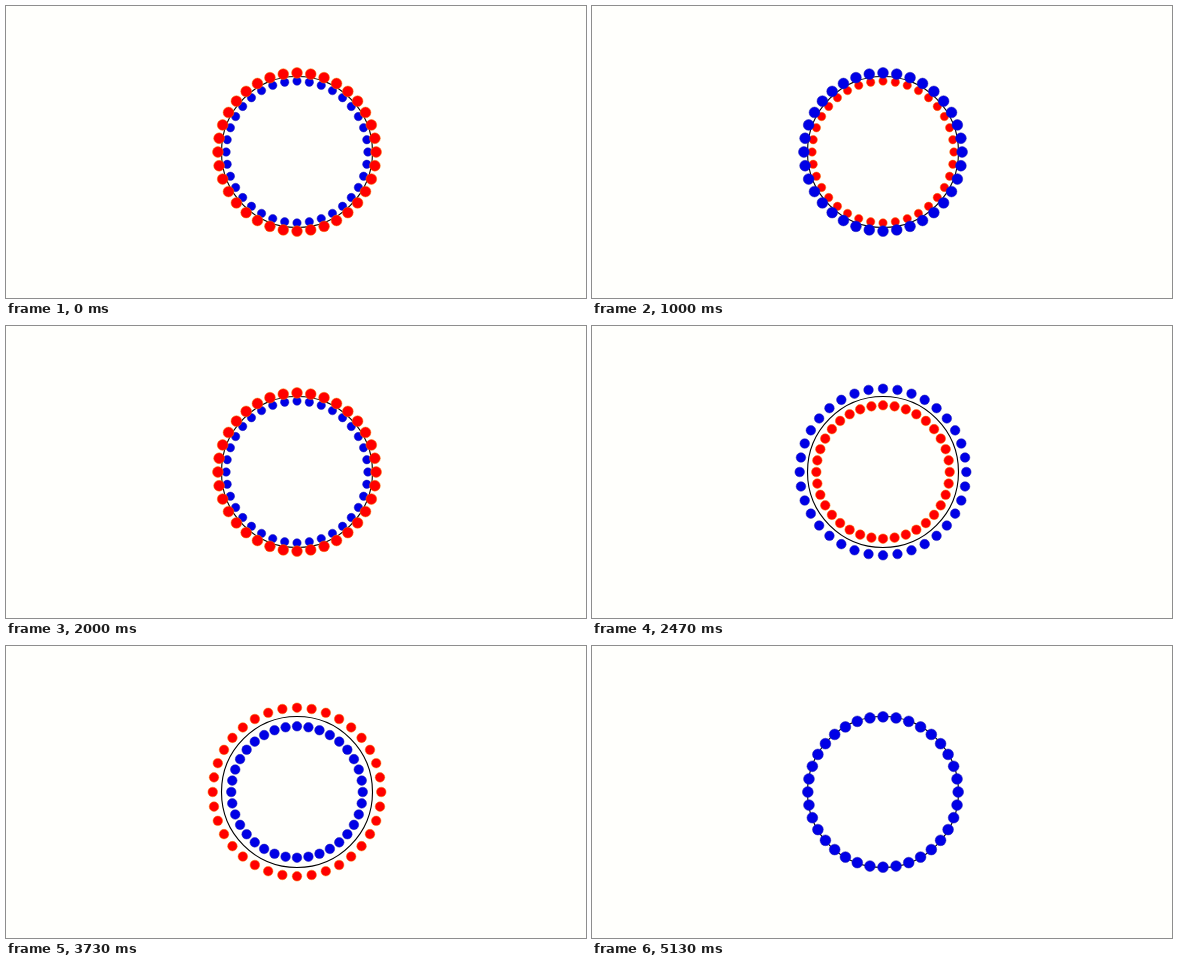
An HTML page with a canvas that plays this animation: 580 by 292 pixels, repeating every 5190 ms.

```html
<!DOCTYPE html>
<html lang="en">
<head>
<meta charset="utf-8">
<title>Twisting rings</title>
<style>
html, body { margin: 0; width: 100%; height: 100%; overflow: hidden; background: #fffffc; }
canvas { display: block; }
</style>
</head>
<body>
<canvas id="stage" width="580" height="292"></canvas>
<script>
const ctx = document.getElementById('stage').getContext('2d');
const TAU = Math.PI * 2, LOOP = 5190;
const CX = 291, CY = 146, RING = 75, TUBE = 9.7, DOTS = 36;

function circle(x, y, r) {
  ctx.beginPath();
  ctx.arc(x, y, r, 0, TAU);
}

// Each ring of dots circles around the tube; depth picks one of three dot sizes.
function drawDots({ fill, edge, angle }) {
  const radius = RING + TUBE * Math.sin(angle);
  const size = 4.8 + 0.6 * Math.round(0.9 * Math.cos(angle));
  ctx.fillStyle = fill;
  ctx.strokeStyle = edge;
  ctx.lineWidth = 0.5;
  for (let i = 0; i < DOTS; i++) {
    const a = i * TAU / DOTS;
    circle(CX + radius * Math.cos(a), CY + radius * Math.sin(a), size);
    ctx.fill();
    ctx.stroke();
  }
}

function draw(now) {
  // 15 steps a second, on a 10 ms clock
  const step = Math.floor((Math.floor(now % LOOP / 10) + 0.5) * 0.15);
  const angle = (25 - 12 * step) * TAU / 360;
  const red = { fill: '#f00', edge: '#f87800', angle };
  const blue = { fill: '#0000e6', edge: '#2020b0', angle: angle + Math.PI };
  const [back, front] = Math.cos(angle) > 0 ? [blue, red] : [red, blue];

  ctx.fillStyle = '#fffffc';
  ctx.fillRect(0, 0, 580, 292);
  drawDots(back);
  ctx.strokeStyle = '#000';
  ctx.lineWidth = 1.1;
  circle(CX, CY, 75.5);
  ctx.stroke();
  drawDots(front);
}

let start;
function tick(now) {
  start ??= now;
  draw(now - start);
  requestAnimationFrame(tick);
}
draw(0);
requestAnimationFrame(tick);
</script>
</body>
</html>
```
